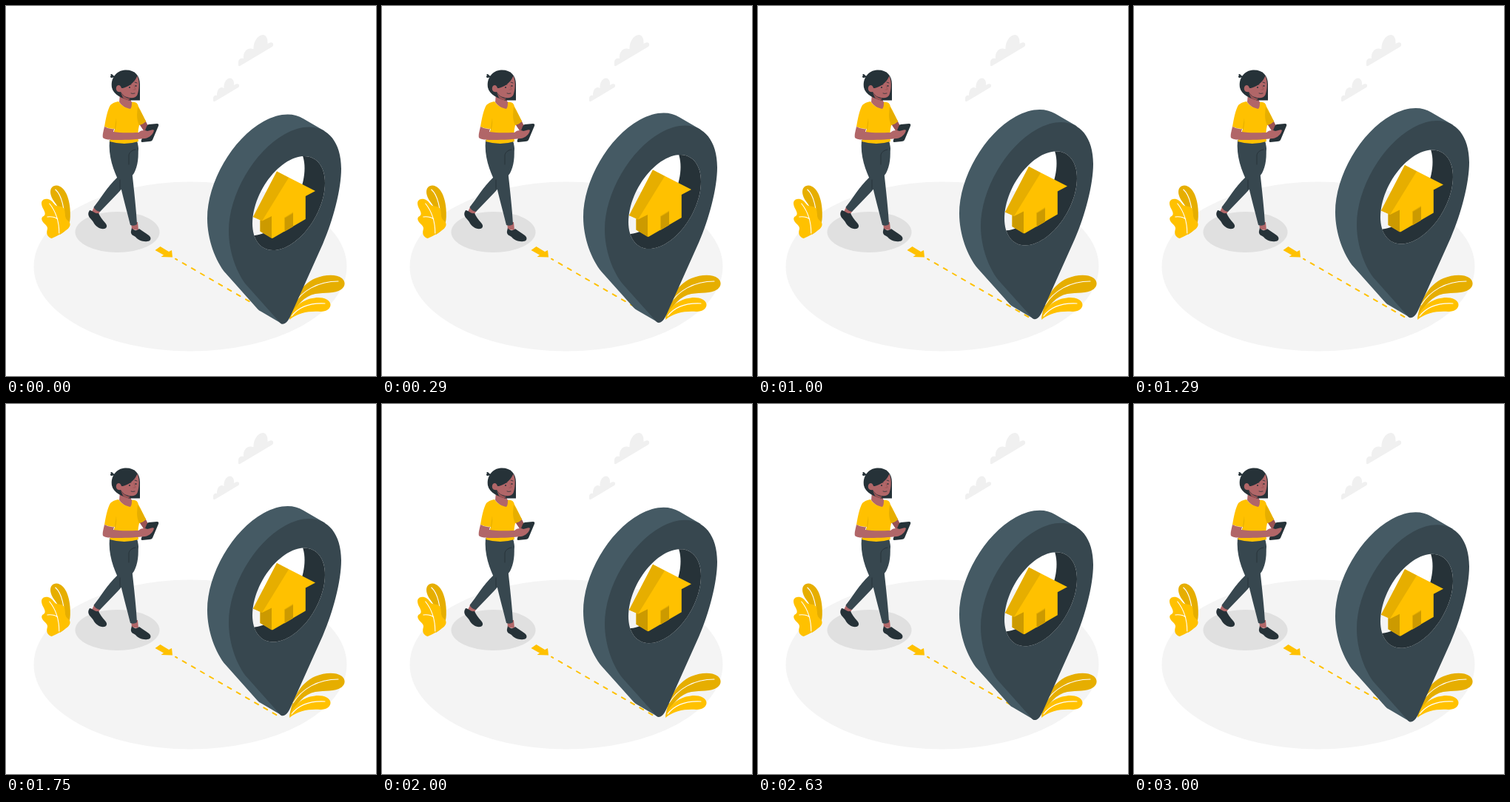
Recreate the animation shown at these times as an HTML page. Size 500 px wide and 500 px high, loop 3040 ms.

```html
<!DOCTYPE html>
<html lang="en">
<head>
<meta charset="utf-8">
<title>Walking to the house pin</title>
<style>
  html, body { margin: 0; width: 100%; height: 100%; overflow: hidden; background: #fff; }
  svg { display: block; width: 100vw; height: 100vh; }
  .sun { fill: #ffc100; }
  .sun-shade { fill: #e6ae00; }
  .sun-deep { fill: #cc9a00; }
  .ink { fill: #263238; }
  .slate { fill: #37474f; }
  .steel { fill: #455a64; }
  .skin { fill: #b16668; }
  .skin-shade { fill: #9a5355; }
  .cloud { fill: #f0f0f0; }
  .line { fill: none; stroke-linecap: round; stroke-linejoin: round; }
  .vein { stroke: #fff; stroke-width: 1.1; }
</style>
</head>
<body>
<svg viewBox="0 0 500 500" xmlns="http://www.w3.org/2000/svg">
  <defs><clipPath id="holeClip"><path id="holeShape"/></clipPath></defs>

  <g class="cloud">
    <path d="M314 80V76C314 72 317 70 321 71C320 63 325 57 331 57.500C333 58 334 58 334.500 58C334 49 340 39 347 39C352 39 354 45 353.500 51C358 48 362 49 361 53C361 54 360 55 359 55.500L317 80.500Q314 82 314 80Z"/>
    <path d="M280 128V125C280 122 282 120 285 121C285 115 287 110 292 110L294.500 111C294 104 298 97 303 97.500C307 98 308.500 102 308 107C312 104 316 105 315 108Q315 109 314 110L283 128.500Q280 130 280 128Z"/>
  </g>

  <ellipse cx="249" cy="352" rx="211.500" ry="114.500" fill="#f4f4f4"/>
  <ellipse cx="150.500" cy="305.500" rx="57" ry="27.500" fill="#e0e0e0"/>

  <g id="leftPlant" transform="translate(.8 0)">
    <path class="sun-shade" d="M72 309C82 303 85.500 297 86 285C87 266 81 243 67 242.500C60 243 58 249 60 256C62 264 70 268 72 280Z"/>
    <path class="line vein" d="M66 248C75 256 78.500 275 78 292"/>
    <path class="sun" d="M61 314C56 313 53 308 55 302C56 299 54 297 51 294C47 290 46 286 50 284C53 282 52 279 50 275C46 268 46 262 52 261C57 260 61 263 64 267C67 271 69 270 73 271C78 272 79 276 79 281C79 286 81 289 84 291C87 294 86 298 83 301Q73 309 61 314Z"/>
    <path class="line vein" d="M58 267C66 277 71 290 71 307M55 285Q64 284 69 288"/>
  </g>

  <g id="rightPlant">
    <path class="sun-shade" d="M383 423C386 400 397 377 418 368C431 363 446 362 454 368C459 372 459 379 453 383C444 389 431 387 418 389C403 392 393 404 383 423Z"/>
    <path class="line vein" d="M388 404C400 385 421 372 449 372"/>
    <path class="sun" d="M383 424C386 409 400 396 417 394.500C427 393 437 396 438.500 403C439 409 433 413 425 413C410 412 395 414 383 424Z"/>
    <path class="line vein" d="M386 419C396 406 412 401 431 402"/>
  </g>

  <path class="sun" d="M208.500 325L220 332L224 330L225 339.500L209.500 339L213 336.500L201.500 330Z"/>
  <path class="line" d="M229 341.700L366 420.500" stroke="#ffc100" stroke-width="2" stroke-dasharray="5.500 8.570" stroke-dashoffset="3"/>

  <g id="walker">
    <!-- rear leg and shoe -->
    <path class="skin" d="M120 270L128 276L124 283L116 278Z"/>
    <path class="ink" d="M113 276C117 276 119 281 125 280C127 284 130 289 134 293C137 296 137 300 133 301C127 302 121 298 118 292C115 287 110 285 111.500 279Z"/>
    <path class="slate" d="M155 200L178 185C180 205 178 216 173 226C165 236 158 246 152 252L127 278Q121 277 118.500 272C128 260 137 244 150 232Z"/>
    <!-- front leg and shoe -->
    <path class="skin" d="M169 292H178L179 303L170 302Z"/>
    <path class="ink" d="M170 300C173 304 177 304 180 301C184 304 189 307 193 310C197 313 196 318 191 318C185 319 178 316 175 312C172 310 168 309 169 304Z"/>
    <path class="slate" d="M140 181H177L179 193C177 204 171 215 170.500 226C173 249 176 275 177 295Q173 298 168 296C163 276 158 258 154 240C145 222 138 203 140 181Z"/>
    <path class="line" d="M175 194Q168 195 166 201L166 214M154 235V247" stroke="#263238" stroke-width=".9"/>

    <!-- far arm, neck, shirt -->
    <path class="skin-shade" d="M179 158L188 154L193 164L187 170Z"/>
    <path class="skin" d="M154 118L169 123V129L173 131Q172 140 167 140Q158 137 153 130Z"/>
    <path class="sun" d="M152 129C156 135 162 138 168 139C170 137 170 133 170 130C175 129 178 131 179 136C183 143 186 150 189 156Q185 160 180 161C178 169 178 176 179 183Q160 189 140 183C142 178 146 172 147 166Q139 166 133 163C135 152 137 141 141 134Q145 130 152 129Z"/>
    <path class="sun-shade" d="M178 136C183 144 186 150 189 156Q185 160 180 161C176 152 177 146 178 136ZM149 151Q150 162 146 173L144 176Q147 169 147 166Z"/>

    <!-- tablet and near arm -->
    <path class="ink" d="M193 160L204 159Q207 159 206 162L198 181Q197 183 194 183L184 184Q182 184 183 181L190 163Q191 160 193 160Z"/>
    <path class="skin" d="M133 163Q140 167 146 166L145 170C157 172 169 171 179 171C184 167 188 168 191 169C195 168 199 166 200 168C199 173 194 178 188 179C179 180 164 181 151 181C143 181 134 181 131 178C130 174 132 168 133 163Z"/>

    <!-- head -->
    <path class="ink" d="M147 95C143 99 139 96 142 94C140 92 143 91 145 94Z"/>
    <path class="ink" d="M161 86.500C174 86 181 94 181 106V127.500H166C157 125 145 120 143 110C141 98 149 87 161 86.500Z"/>
    <path class="skin" d="M158 111C166 109 174 103 177.500 94.500C181 103 180 113 177.500 120C175 125 169 125 163 123C159 122 157 119 155 116C151 117 148 114 149 110C150 106 155 106 156 111Z"/>
    <path class="skin-shade" d="M155 117Q161 125 168 125Q164 130 158 124Z"/>
    <path class="line" d="M165 107Q167 105 169 106M174 103L177 104M169 118Q171 119 174 118" stroke="#263238" stroke-width=".8"/>
    <path class="line" d="M173 107L175 113L172 113" stroke="#9a5355" stroke-width=".8"/>
    <circle class="ink" cx="167" cy="110" r="1"/>
    <circle class="ink" cx="175.500" cy="108" r="1"/>
  </g>

  <g id="pin">
    <path class="steel" d="M272 287.200C272 238 306 179.300 348 156C369 144.400 388 143.800 401.750 152.200L431 169.200L400 178C350 195 312 260 312 305C312 330 345 375 373 429.500L344.500 412.800Q342 411.500 340 409.400L297 361.300C283 345 272 315.200 272 287.200Z"/>
    <path class="slate" id="face" fill-rule="evenodd"/>
    <path class="ink" id="wall" fill-rule="evenodd" clip-path="url(#holeClip)"/>
    <g id="house">
      <path class="sun" d="M366 223.500L418 250L404.800 257V288L360 314L343.500 304.500V289L334 285Z"/>
      <path class="sun-shade" d="M366 223.500L382 232L346 290.500L334 285Z"/>
      <path class="sun-deep" d="M343.500 289.500L346 290.500L359 284V314L343.500 304.500Z"/>
      <path class="sun-shade" d="M376 286L388 278.500V298L376 305Z"/>
      <path class="sun-deep" d="M377 286.500L388 280V298L377 304.300Z"/>
    </g>
  </g>
</svg>
<script>
  const LOOP = 3040, LIFT = 10;
  const byId = id => document.getElementById(id);

  // Isometric circle: a circle sheared upward to the right.
  function isoCircle(cx, cy) {
    const points = Array.from({ length: 90 }, (_, i) => {
      const a = i * Math.PI / 45;
      const x = cx + 49 * Math.cos(a);
      const y = cy - 27.2 * Math.cos(a) + 57.4 * Math.sin(a);
      return x.toFixed(2) + ' ' + y.toFixed(2);
    });
    return 'M' + points.join('L') + 'Z';
  }

  const frontHole = isoCircle(382, 266.5);
  const backHole = isoCircle(354.5, 246.5);
  const outline = 'M301 304.2C301 255 335 196.3 377 173C419 149.7 453 170.6 453 219.8' +
    'C453 247.8 442 289.9 428 321.7L385 417.6C380 430 373 433 369 426.4' +
    'L326 378.3C312 362.1 301 332.2 301 304.2Z';

  byId('holeShape').setAttribute('d', frontHole);
  byId('face').setAttribute('d', outline + frontHole);
  byId('wall').setAttribute('d', 'M270 140H460V440H270Z' + backHole);

  function draw(time) {
    const phase = (time % LOOP) / LOOP;
    const rise = LIFT * (1 - Math.abs(1 - 2 * phase));
    byId('pin').setAttribute('transform', `translate(0 ${-rise.toFixed(3)})`);
  }

  const start = performance.now();
  function tick() {
    draw(performance.now() - start);
    requestAnimationFrame(tick);
  }
  tick();
</script>
</body>
</html>
```
